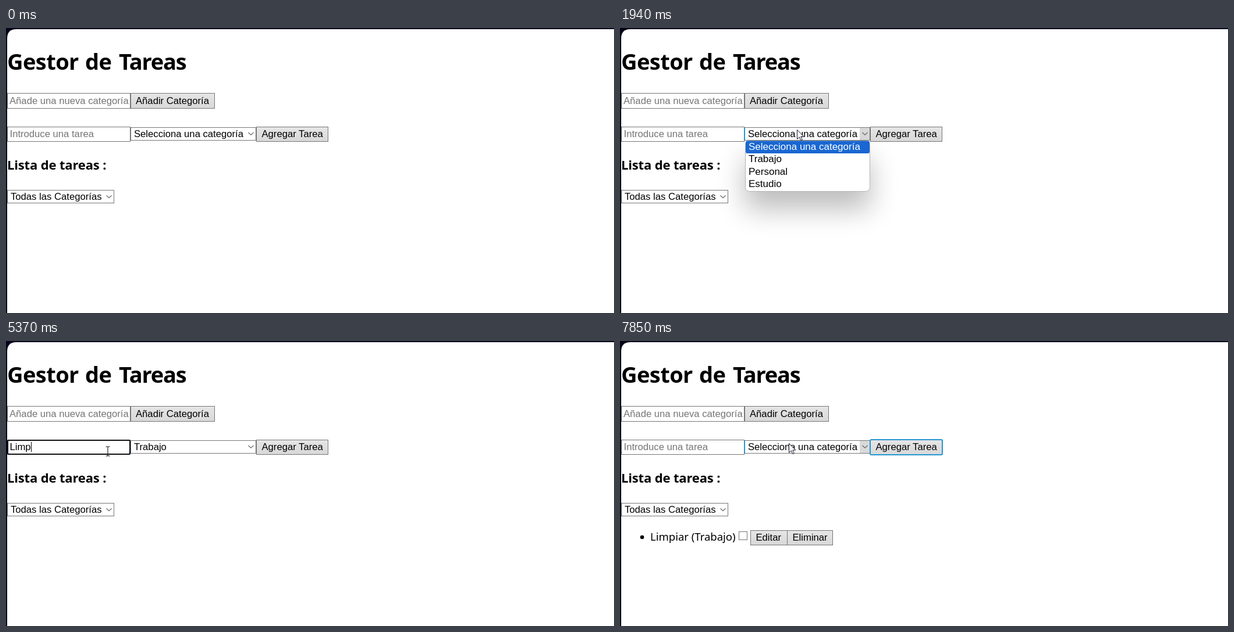
An HTML page that plays this animation: 1045 px wide and 491 px high, repeating every 8 s.

```html
<!DOCTYPE html>
<html lang="es">
<head>
<meta charset="utf-8">
<title>Gestor de Tareas</title>
<style>
  html, body { margin: 0; width: 100%; height: 100%; overflow: hidden; background: #fff; }
  svg { display: block; width: 100%; height: 100%; }
  text { white-space: pre; }
  .ui { font: 16.67px "Liberation Sans", Arial, sans-serif; }
  .menu { font-size: 17px; }
  .h1 { font: bold 38px "Noto Sans", "Open Sans", sans-serif; letter-spacing: -.55px; }
  .h3 { font: bold 22px "Noto Sans", "Open Sans", sans-serif; letter-spacing: -.15px; }
  .li { font: 18.5px "Noto Sans", "Open Sans", sans-serif; }
</style>
</head>
<body>
<svg id="stage" viewBox="0 0 1045 491">
  <defs>
    <linearGradient id="face" x2="0" y2="1">
      <stop offset="0" stop-color="#e6e6e6"/>
      <stop offset="1" stop-color="#d8d8d8"/>
    </linearGradient>
    <filter id="blur" x="-60%" y="-110%" width="220%" height="320%">
      <feGaussianBlur stdDeviation="24"/>
    </filter>
  </defs>
</svg>
<script>
const LOOP = 8000;
const GREY = '#767676', BLUE = '#2597d0', HINT = '#757575';
const OPEN = 1750, CLOSE = 3310, PICK = 3330, FOCUS = 4250, PRESS = 7030, ADD = 7240;
const TASK = 'Limpiar', CHOOSE = 'Selecciona una categoría', WORK = 'Trabajo';
const KEY_TIMES = [4850, 5030, 5190, 5370, 5510, 5600, 5690];
const CLICKS = [[1730, 1940], [3080, 3310], [4230, 4460], [7030, 7240]];

// Pointer path: time, x, y
const PATH = [
  [110, 945, 485], [380, 380, 205], [560, 112, 64], [660, 90, 82], [870, 110, 125],
  [920, 110, 125], [1200, 235, 128], [1540, 304, 175],
  [2080, 304, 175], [2350, 304, 214], [2740, 304, 214], [2880, 304, 224],
  [3500, 304, 224], [4000, 175, 190], [6210, 175, 190], [6470, 295, 186],
  [6920, 490, 185], [7510, 490, 185], [7850, 290, 176], [LOOP, 290, 176]
];

const stage = document.getElementById('stage');

function set(el, attrs) {
  for (const key in attrs) el.setAttribute(key, attrs[key]);
  return el;
}
function add(tag, attrs, parent = stage) {
  const el = document.createElementNS('http://www.w3.org/2000/svg', tag);
  parent.appendChild(set(el, attrs));
  return el;
}
function text(str, x, y, cls = 'ui', parent = stage, fill = '#000') {
  const el = add('text', { x, y, class: cls, fill }, parent);
  el.textContent = str;
  return el;
}
function show(el, on) {
  el.style.display = on ? '' : 'none';
}
function box(x, y, w, h, fill, parent = stage) {
  return add('rect', { x: x + .5, y: y + .5, width: w - 1, height: h - 1, fill, stroke: GREY }, parent);
}
function ring(x, y, w, h, stroke) {
  return add('rect', { x: x + 1, y: y + 1, width: w - 2, height: h - 2, rx: 2, fill: 'none', stroke, 'stroke-width': 2 });
}
function button(label, x, y, w, h, textX, baseline, parent) {
  const el = box(x, y, w, h, 'url(#face)', parent);
  text(label, textX, baseline, 'ui', parent);
  return el;
}
function chevron(x, y) {
  return add('path', { d: `M${x - 4.5} ${y - 2}l4.5 4.2l4.5 -4.2`, fill: 'none', stroke: '#666', 'stroke-width': 1.2 });
}

// Page frame and headings
add('rect', { width: 1045, height: 491, fill: '#05021a' });
add('path', { d: 'M2 491V18Q2 2 18 2H1045V491Z', fill: '#fff' });
text('Gestor', 2, 72, 'h1');
text('de', 136, 72, 'h1');
text('Tareas', 194, 72, 'h1').style.letterSpacing = '-1.2px';
text('Lista de tareas :', 2, 244, 'h3');

// Category form
const catInput = box(2, 112, 212, 27, '#fff');
text('Añade una nueva categoría', 6, 131, 'ui', stage, HINT);
const catButton = button('Añadir Categoría', 214, 112, 145, 27, 223, 131);

// Task form
const taskInput = box(2, 170, 212, 26, '#fff');
const taskText = text('', 6.5, 188);
const caret = add('rect', { y: 174, width: 1, height: 17 });
box(214, 171, 216, 23, '#fff');
const arrowFace = add('rect', { x: 412, y: 172, width: 17, height: 21, fill: '#d9d9d9' });
chevron(421, 182);
const selectText = text(CHOOSE, 220, 188);
const selectEdge = add('rect', { x: 213, y: 172, width: 2, height: 21, fill: BLUE });
const addButton = button('Agregar Tarea', 430, 170, 124, 26, 439.5, 188);
const inputRing = ring(2, 170, 212, 26, '#101014');
const selectRing = ring(214, 171, 216, 23, '#101014');
const buttonRing = ring(429, 169, 126, 28, BLUE);

// Filter and list
box(2, 279, 184, 23, '#fff');
text('Todas las Categorías', 8, 296);
chevron(177, 290.5);
const item = add('g', {});
add('circle', { cx: 38, cy: 338, r: 3.3 }, item);
text(TASK + ' (' + WORK + ')', 52, 344, 'li', item);
box(204, 328, 15, 15, '#fff', item);
button('Editar', 224, 326, 64, 26, 233.5, 344, item);
button('Eliminar', 287, 326, 79, 26, 296.5, 344, item);

// Drop-down menu
const menu = add('g', {});
add('rect', { x: 215, y: 224, width: 215, height: 88, fill: '#000', opacity: .26, filter: 'url(#blur)' }, menu);
add('rect', { x: 215.5, y: 194.5, width: 214, height: 87, rx: 7, fill: '#fff', stroke: '#b4b4b4' }, menu);
const bar = add('rect', { x: 216, width: 213, height: 21.5, rx: 3, fill: '#1967d2' }, menu);
const rows = [CHOOSE, WORK, 'Personal', 'Estudio'].map((label, i) =>
  text(label, 221, Math.round(210 + 21.4 * i), 'ui menu', menu));

// Pointer
const halo = add('circle', { r: 15, fill: '#fff600', opacity: .62 });
const pointer = add('g', {});
const arrow = add('path', {
  d: 'M.5 .5V16.4L4.3 12.9L6.9 18.7L9.3 17.6L6.8 12H11.8Z',
  fill: '#fff', stroke: '#15152a', 'stroke-width': 1
}, pointer);
const beam = add('path', {
  d: 'M-3.5 -8H-1L0 -7L1 -8H3.5M0 -7V7M-3.5 8H-1L0 7L1 8H3.5',
  fill: 'none', stroke: '#111', 'stroke-width': 1.1
}, pointer);

// Slope at a key; zero beside a pause
function slope(i, axis) {
  const here = PATH[i], prev = PATH[i - 1], next = PATH[i + 1];
  const same = p => p[1] === here[1] && p[2] === here[2];
  if (!next || same(next)) return 0;
  if (!prev) return (next[axis] - here[axis]) / (next[0] - here[0]);
  if (same(prev)) return 0;
  return (next[axis] - prev[axis]) / (next[0] - prev[0]);
}
function pointerAt(t) {
  let i = 0;
  while (i < PATH.length - 2 && t >= PATH[i + 1][0]) i++;
  const a = PATH[i], b = PATH[i + 1], span = b[0] - a[0];
  const u = Math.max(0, (t - a[0]) / span), v = 1 - u;
  return [1, 2].map(k =>
    v * v * (1 + 2 * u) * a[k] + u * u * (3 - 2 * u) * b[k] +
    u * v * span * (v * slope(i, k) - u * slope(i + 1, k)));
}

function render(t) {
  const [x, y] = pointerAt(t);
  const between = (from, to) => t >= from && t < to;
  const over = (l, top, r, b) => t >= 110 && x >= l && x < r && y >= top && y < b;

  const overCat = over(2, 112, 214, 139);
  const overTask = over(2, 170, 214, 196);
  const overTitle = over(2, 32, 312, 86) || over(2, 222, 172, 250);
  const isBeam = overCat || overTask || overTitle;

  show(pointer, t >= 110);
  show(beam, isBeam);
  show(arrow, !isBeam);
  set(pointer, { transform: `translate(${Math.round(x)} ${Math.round(y)})` });
  show(halo, CLICKS.some(c => between(c[0], c[1])));
  set(halo, { cx: Math.round(x) - (isBeam ? 2 : 0), cy: Math.round(y) });

  set(catInput, { stroke: overCat ? BLUE : GREY });
  set(catButton, { stroke: over(214, 112, 359, 139) ? BLUE : GREY });
  set(taskInput, { stroke: overTask ? BLUE : GREY });
  set(addButton, { stroke: over(430, 170, 554, 196) ? BLUE : GREY });

  const hot = between(OPEN, PICK) || over(214, 171, 430, 194);
  show(arrowFace, hot);
  show(selectEdge, hot);
  selectText.textContent = between(PICK, ADD) ? WORK : CHOOSE;
  show(selectRing, between(PICK, FOCUS));
  show(inputRing, between(FOCUS, PRESS));
  show(buttonRing, t >= PRESS);
  show(item, t >= ADD);

  const count = t < ADD ? KEY_TIMES.filter(k => t >= k).length : 0;
  taskText.textContent = count ? TASK.slice(0, count) : 'Introduce una tarea';
  set(taskText, { fill: count ? '#000' : HINT });
  const lastKey = count ? KEY_TIMES[count - 1] : FOCUS;
  show(caret, between(FOCUS, PRESS) && (t - lastKey) % 1040 < 520);
  set(caret, { x: Math.round(6.5 + (count ? taskText.getComputedTextLength() : 0)) });

  show(menu, between(OPEN, CLOSE));
  set(menu, { opacity: t < OPEN + 20 ? .6 : 1 });
  const active = y < 216 ? 0 : 1;
  set(bar, { y: 194.5 + 21.4 * active });
  rows.forEach((row, i) => set(row, { fill: i === active ? '#fff' : '#000' }));
}

const start = performance.now();
function tick() {
  render((performance.now() - start) % LOOP);
  requestAnimationFrame(tick);
}
tick();
</script>
</body>
</html>
```
